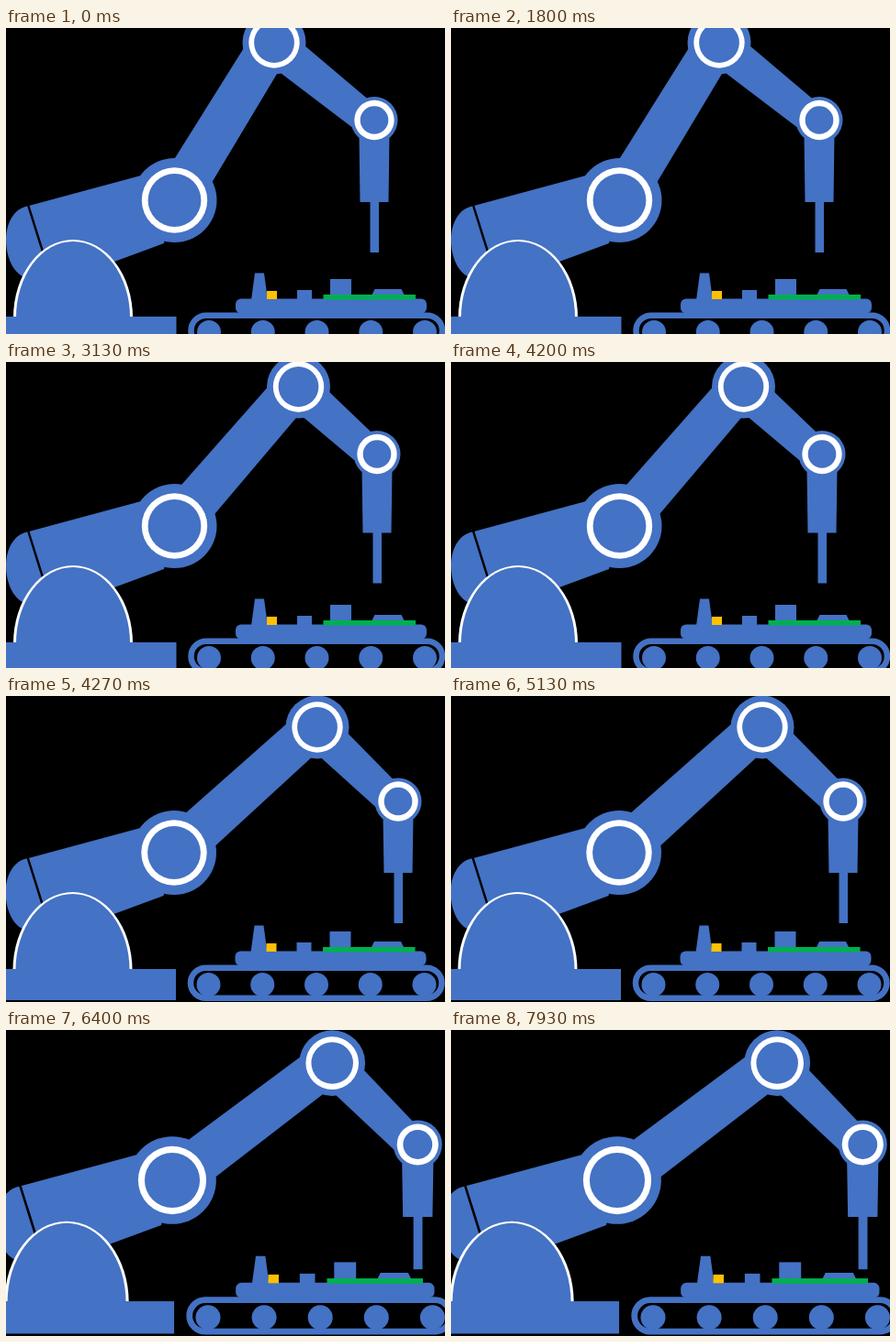
Write an HTML page with a canvas that moves like this. It is 478 px wide and 334 px high and loops after 8000 ms.

```html
<!DOCTYPE html>
<html lang="en">
<head>
<meta charset="utf-8">
<title>Robot arm</title>
<style>
  html, body { margin: 0; width: 100%; height: 100%; overflow: hidden; background: #000; }
  canvas { display: block; }
</style>
</head>
<body>
<canvas id="stage" width="478" height="334"></canvas>
<script>
const ctx = document.getElementById('stage').getContext('2d');
const BLUE = '#4472c4', WHITE = '#fff', GOLD = '#ffc000', GREEN = '#00b050';
const LOOP = 8000;
const ELBOW = { x: 183.5, y: 188 };

// dx, dy and zoom place the whole scene, with the elbow as its fixed point.
const poses = [
  { start: 0, dx: 0, dy: 0, zoom: 1, wrist: { x: 292, y: 16 }, tip: { x: 401, y: 100.5 }, hand: 89.5 },
  { start: 2130, dx: 0, dy: -9, zoom: 1, wrist: { x: 318.5, y: 36 }, tip: { x: 404, y: 109.5 }, hand: 86 },
  { start: 4270, dx: -0.5, dy: -17, zoom: 1, wrist: { x: 339.5, y: 51 }, tip: { x: 427.5, y: 132 }, hand: 78 },
  { start: 6400, dx: -2.5, dy: -24, zoom: 1.04, wrist: { x: 351, y: 65 }, tip: { x: 440.5, y: 150.5 }, hand: 76 }
];

function box(x, y, width, height, color = BLUE) {
  ctx.fillStyle = color;
  ctx.fillRect(x, y, width, height);
}

function ellipse(x, y, rx, ry = rx, color = BLUE, from = 0) {
  ctx.beginPath();
  ctx.ellipse(x, y, rx, ry, 0, from, Math.PI * 2);
  ctx.fillStyle = color;
  ctx.fill();
}

// Symmetric trapezoid around x.
function taper(x, top, bottom, topWidth, bottomWidth) {
  ctx.beginPath();
  ctx.moveTo(x - topWidth / 2, top);
  ctx.lineTo(x + topWidth / 2, top);
  ctx.lineTo(x + bottomWidth / 2, bottom);
  ctx.lineTo(x - bottomWidth / 2, bottom);
  ctx.fillStyle = BLUE;
  ctx.fill();
}

// Tapered bar from a to b; each side gives its distance from the axis at a and at b.
function limb(a, b, left, right) {
  ctx.save();
  ctx.translate(a.x, a.y);
  ctx.rotate(Math.atan2(b.y - a.y, b.x - a.x));
  const length = Math.hypot(b.x - a.x, b.y - a.y);
  ctx.beginPath();
  ctx.moveTo(0, -left[0]);
  ctx.lineTo(length, -left[1]);
  ctx.lineTo(length, right[1]);
  ctx.lineTo(0, right[0]);
  ctx.fillStyle = BLUE;
  ctx.fill();
  ctx.restore();
}

function joint({ x, y }, outer, ring, width) {
  ellipse(x, y, outer);
  ellipse(x, y, ring, ring, WHITE);
  ellipse(x, y, ring - width);
}

function lowerArm() {
  ctx.beginPath();
  ctx.moveTo(18, 271);
  ctx.bezierCurveTo(-6, 258, -8, 199, 25, 194);
  ctx.lineTo(147, 161);
  ctx.lineTo(ELBOW.x, ELBOW.y);
  ctx.lineTo(172, 235);
  ctx.lineTo(118, 255);
  ctx.fillStyle = BLUE;
  ctx.fill();
  ctx.beginPath();
  ctx.moveTo(24, 193);
  ctx.lineTo(40, 244);
  ctx.lineWidth = 2.5;
  ctx.strokeStyle = '#000';
  ctx.stroke();
}

function pedestal() {
  ellipse(73, 316, 65, 85, WHITE, Math.PI);
  ellipse(73, 316, 62, 83, BLUE, Math.PI);
  box(-20, 315, 205.5, 34);
}

function cart() {
  ctx.beginPath();
  ctx.roundRect(201.5, 313.7, 273.5, 33, 16.5);
  ctx.lineWidth = 6.5;
  ctx.strokeStyle = BLUE;
  ctx.stroke();
  for (let i = 0; i < 5; i++) ellipse(221 + i * 58.75, 332, 13);

  ctx.beginPath();
  ctx.roundRect(250, 295.5, 208, 16, 6);
  ctx.fill();
  taper(276, 267.5, 297, 10, 18);
  box(284, 287, 11, 9, GOLD);
  box(317, 286, 16, 10);
  box(353, 274, 23, 18);
  taper(416, 285, 292, 29, 36);
  box(345.5, 291, 100.5, 5.5, GREEN);
}

function draw({ dx, dy, zoom, wrist, tip, hand }) {
  ctx.resetTransform();
  box(0, 0, 478, 334, '#000');
  ctx.translate(ELBOW.x + dx, ELBOW.y + dy);
  ctx.scale(zoom, zoom);
  ctx.translate(-ELBOW.x, -ELBOW.y);

  lowerArm();
  pedestal();
  limb(ELBOW, wrist, [24, 25], [25, 20]);
  limb(wrist, tip, [19, 13], [22, 21]);
  taper(tip.x, tip.y + 15, tip.y + hand, 33, 31);
  box(tip.x - 4.5, tip.y + hand - 1, 9.5, 56);
  joint(ELBOW, 46, 35.7, 6.8);
  joint(wrist, 34.5, 27.7, 5.8);
  joint(tip, 25.5, 21.7, 6.4);
  cart();
}

function tick() {
  const time = performance.now() % LOOP;
  draw(poses.findLast(pose => pose.start <= time));
  requestAnimationFrame(tick);
}
tick();
</script>
</body>
</html>
```
